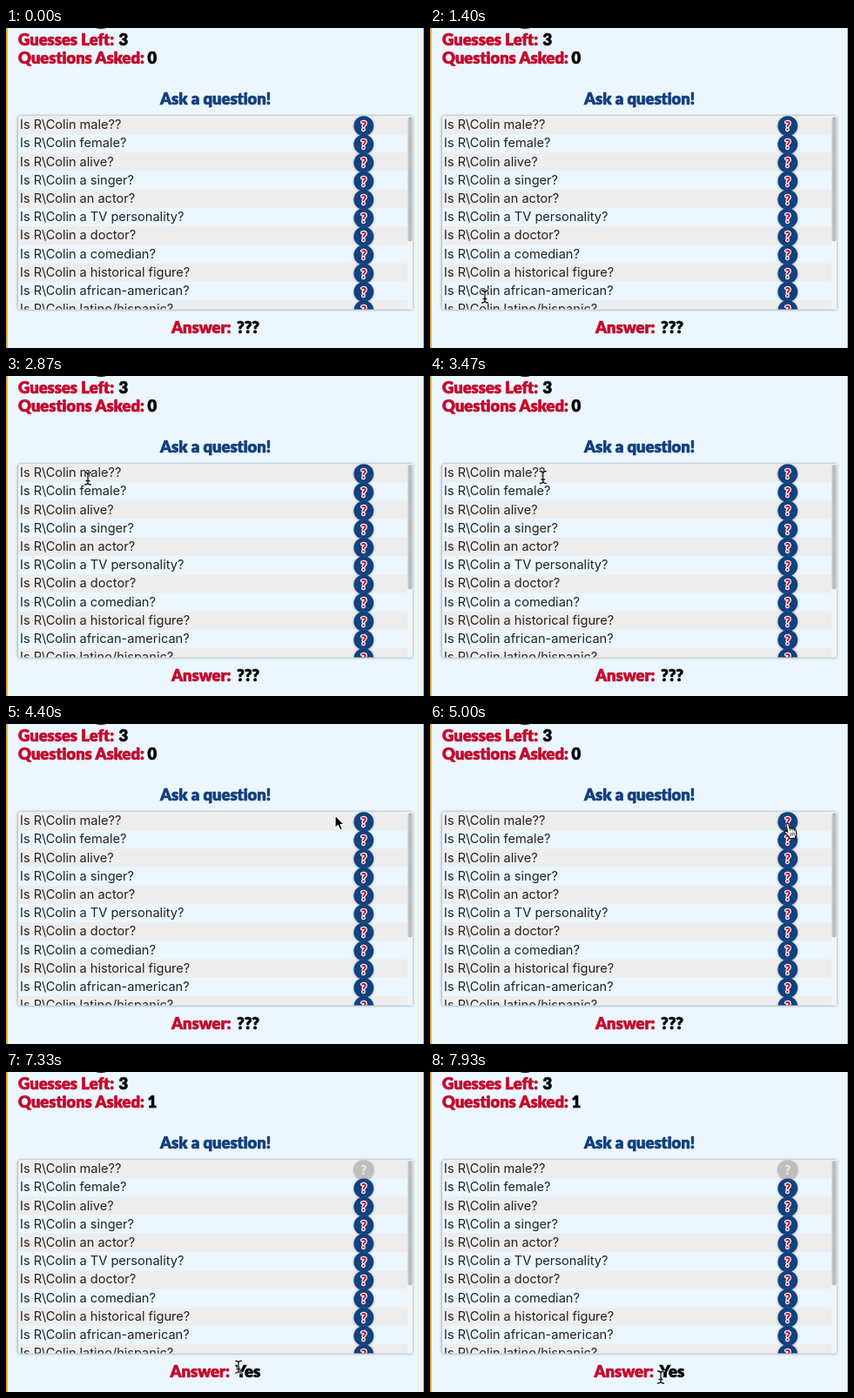
Write an HTML page that moves like this. It is 480 px wide and 368 px high and loops after 8 s.

```html
<!DOCTYPE html>
<html lang="en">
<head>
<meta charset="utf-8">
<style>
  html, body { margin: 0; width: 100%; height: 100%; overflow: hidden; background: #ebf6fe; }
  svg { display: block; width: 480px; height: 368px; }
  .head { font: 900 18.4px Lato, "Open Sans", sans-serif; font-variant-ligatures: none; stroke-width: .7; stroke-linejoin: round; }
  .red { fill: #c4092b; stroke: #c4092b; }
  .blue { fill: #123f7c; stroke: #123f7c; }
  .black { fill: #050505; stroke: #050505; }
  .row { font: 400 14.6px Inter, "Open Sans", sans-serif; fill: #222; }
  .mark { font: 900 14px Lato, sans-serif; text-anchor: middle; fill: #c9082b; stroke: #fff; stroke-width: 2.4; stroke-linejoin: round; paint-order: stroke; }
  .off .disc { fill: #bebebe; }
  .off .mark { fill: #e9e9e9; stroke: #c9c9c9; stroke-width: 1; }
</style>
</head>
<body>
<svg viewBox="0 0 480 368">
  <defs>
    <clipPath id="listClip"><rect x="14" y="101" width="453" height="222.5" rx="2"/></clipPath>
    <filter id="soft" x="-10%" y="-10%" width="120%" height="120%"><feGaussianBlur stdDeviation="1.6"/></filter>
    <filter id="softDot" x="-30%" y="-30%" width="160%" height="160%"><feGaussianBlur stdDeviation="1"/></filter>
    <path id="beamShape" d="M-3.5-7Q-.5-7 0-5Q.5-7 3.5-7M0-5V5M-3.5 7Q-.5 7 0 5Q.5 7 3.5 7M-2 2.5H2"/>
  </defs>
  <rect width="480" height="368" fill="#ebf6fe"/>
  <rect width="1.7" height="368" fill="#d6a11f"/>
  <rect x="479" width="1" height="368" fill="#d6a11f"/>
  <ellipse cx="109" cy="-2.5" rx="9" ry="3.7" fill="#333"/>

  <g class="head">
    <text class="red" x="14" y="20">Guesses Left:</text>
    <text class="black" x="129.5" y="20">3</text>
    <text class="red" x="14" y="40.5">Questions Asked:</text>
    <text class="black" id="asked" x="162.5" y="40.5">0</text>
    <text class="blue" x="240.5" y="88" text-anchor="middle">Ask a question!</text>
    <text class="red" id="label" y="350.5">Answer:</text>
    <text class="black" id="answer" x="278" y="350.5" text-anchor="middle"></text>
  </g>

  <rect x="13.5" y="101" width="453.5" height="223" rx="3" fill="#8b949b" filter="url(#soft)"/>
  <g clip-path="url(#listClip)">
    <rect x="14" y="101" width="453" height="223" fill="#ebf6fe"/>
    <g id="list"></g>
    <rect x="461" y="101" width="6" height="223" fill="#f2f5f7"/>
    <rect x="461.5" y="102" width="5" height="143.5" rx="2.5" fill="#bcbdbe"/>
  </g>

  <g id="cursor">
    <g id="beam" fill="none" stroke-linecap="round">
      <use href="#beamShape" stroke="#fff" stroke-width="2.6"/>
      <use href="#beamShape" stroke="#111" stroke-width="1.3"/>
    </g>
    <path id="arrow" d="M0 0V14.5L3.3 11.5L5.7 17L8.3 15.8L6 10.6H10.3Z" fill="#050505" stroke="#fff" stroke-width="1.1" stroke-linejoin="round"/>
    <g id="hand" stroke="#111" stroke-linecap="round" stroke-linejoin="round">
      <path d="M-2 1.2Q-1.8-.5-.6-.4Q.5-.3.8 1.2L2 5.6Q3.6 4.4 4.6 5.8Q6.2 4.8 7.1 6.4Q8.8 5.7 9.2 7.8L9.9 11.6Q9.9 13.4 8.6 15.1V16.6L2.3 17.3Q1.6 15 -.7 13.1L-3.4 10.6Q-4.3 9.1-2.8 8.7Q-1.8 8.6-.4 9.8Z" fill="#fff" stroke-width="1.2"/>
      <path d="M2 5.6L2.6 8.2M4.6 5.8L5.1 8M7.1 6.4L7.5 8.4M3 11L3.5 14M5 10.7L5.5 13.7M7 10.4L7.4 13.4" fill="none" stroke-width=".8"/>
    </g>
  </g>
</svg>
<script>
const LOOP = 8000, STEP = 1000 / 15, PITCH = 21.2, CLICK = 6600;
const $ = id => document.getElementById(id);
const subject = 'R\\Colin';
const questions = ['male??', 'female?', 'alive?', 'a singer?', 'an actor?', 'a TV personality?',
  'a doctor?', 'a comedian?', 'a historical figure?', 'african-american?', 'latino/hispanic?'];

const row = (question, i) => {
  const y = i * PITCH;
  return `<rect x="14" y="${101 + y}" width="447" height="${PITCH}" fill="${i % 2 ? '#ebf6fe' : '#ededed'}"/>
    <g class="row"><text x="16" y="${116.2 + y}">Is ${subject}</text><text x="84.5" y="${116.2 + y}">${question}</text></g>`;
};
const button = (question, i) => `<g class="button" transform="translate(410.8 ${112.6 + i * PITCH})">
    <circle r="11.7" cy=".5" fill="#68737d" opacity=".5" filter="url(#softDot)"/>
    <circle class="disc" r="11.4" fill="#11427e"/><text class="mark" y="5.4">?</text></g>`;
$('list').innerHTML = questions.map(row).join('') + questions.map(button).join('');
const firstButton = document.querySelector('.button');

// time, x, y, cursor shown until the next key
const path = [
  [900, 50, 378, 'arrow'], [1130, 57, 344, 'arrow'], [1270, 61, 318, 'beam'],
  [1400, 63, 309, 'beam'], [1800, 65, 297, 'beam'], [2600, 93, 121, 'beam'],
  [2730, 94, 118, 'beam'], [2870, 94, 118, 'beam'], [3470, 130, 116.5, 'beam'],
  [3700, 130, 116.5, 'beam'], [3800, 142, 115, 'arrow'], [4400, 378, 105, 'arrow'],
  [4660, 402, 110, 'hand'], [5000, 411, 114.5, 'hand'], [6870, 411, 114.5, 'hand'],
  [6970, 398, 130, 'arrow'], [7330, 267, 339, 'beam'], [7530, 265, 345, 'beam'],
  [7930, 265, 351, 'beam'], [8000, 265, 351, 'beam']
];

function cursorAt(t) {
  const i = path.findIndex((key, n) => n < path.length - 1 && t >= key[0] && t < path[n + 1][0]);
  if (i < 0) return null;
  const [t0, x0, y0, kind] = path[i], [t1, x1, y1] = path[i + 1];
  const k = (t - t0) / (t1 - t0);
  return { x: x0 + (x1 - x0) * k, y: y0 + (y1 - y0) * k, kind };
}

const show = (el, on) => el.setAttribute('visibility', on ? 'visible' : 'hidden');

function draw(time) {
  const now = time % LOOP;
  const t = Math.floor((now + 4) / STEP) * STEP;
  const answered = now >= CLICK - 4;
  $('asked').textContent = answered ? '1' : '0';
  $('answer').textContent = answered ? 'Yes' : '???';
  $('label').setAttribute('x', answered ? 188.5 : 190);
  firstButton.classList.toggle('off', answered);

  const c = cursorAt(t);
  for (const kind of ['beam', 'arrow', 'hand']) show($(kind), c && c.kind === kind);
  if (c) $('cursor').setAttribute('transform', `translate(${c.x} ${c.y})`);
}

function tick(time) {
  draw(time);
  requestAnimationFrame(tick);
}
draw(0);
requestAnimationFrame(tick);
</script>
</body>
</html>
```
